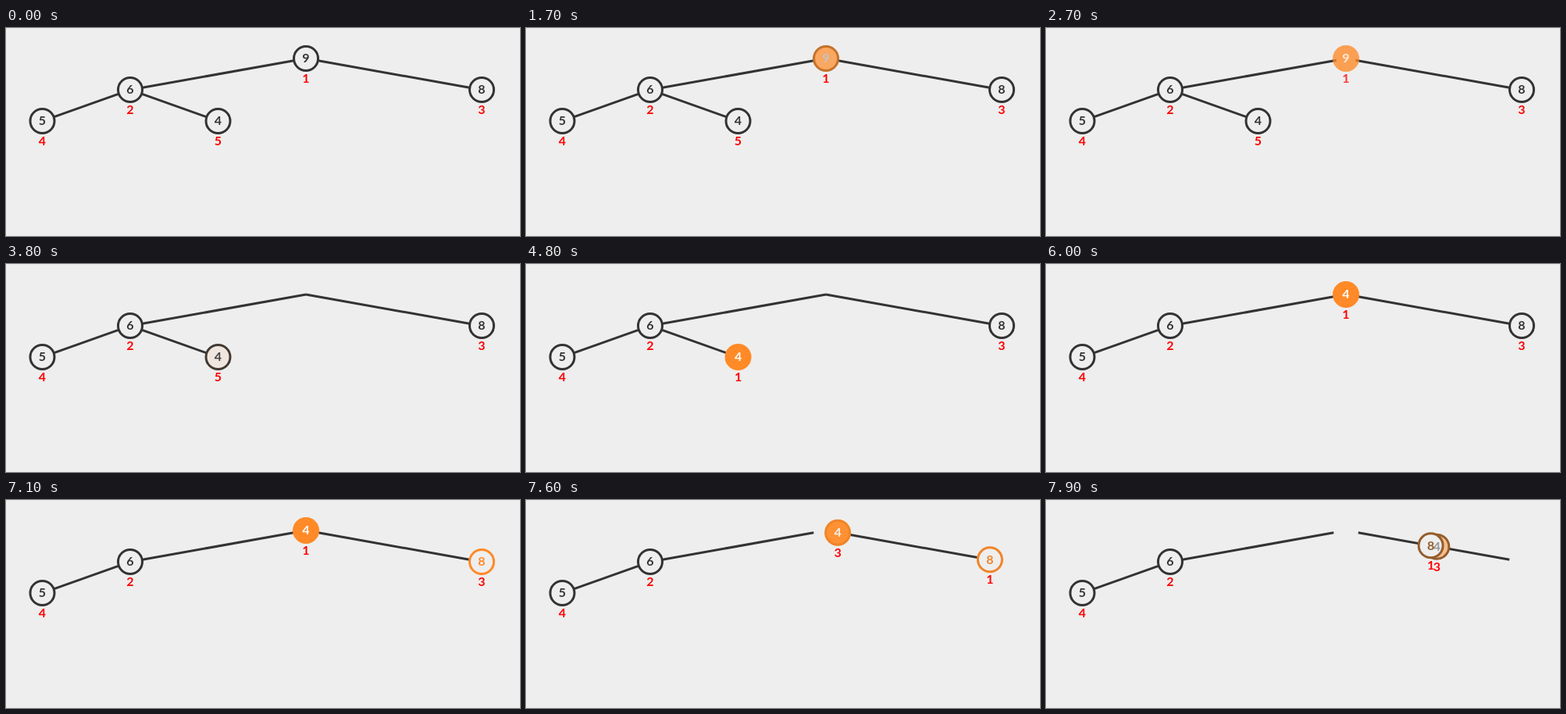
An HTML page for the animation above (8000 ms loop, 658x266 px).

```html
<!DOCTYPE html>
<html lang="en">
<head>
<meta charset="utf-8">
<title>Heap: extract max</title>
<style>
  html, body { margin: 0; width: 100%; height: 100%; overflow: hidden; background: #eee; }
  svg { display: block; width: 658px; height: 266px; }
  line { stroke: #333; stroke-width: 3; }
  circle { stroke-width: 3; }
  text { font: bold 16px Lato, "Open Sans", sans-serif; text-anchor: middle; }
  .index { fill: #f00; }
</style>
</head>
<body>
<svg viewBox="0 0 658 266">
  <rect width="658" height="1" fill="#e9e9e9"/>
  <g id="edges"></g>
  <g id="circles"></g>
  <g id="texts"></g>
</svg>
<script>
const LOOP = 8000, TICK = 100, SPAN = 1200, GAP = 16;
const DARK = [51, 51, 51], PALE = [238, 238, 238], ORANGE = [255, 138, 39], WHITE = [255, 255, 255];
const PLAIN = { fill: PALE, stroke: DARK, ink: DARK };
const SOLID = { fill: ORANGE, stroke: ORANGE, ink: WHITE };
const RING = { fill: PALE, stroke: ORANGE, ink: ORANGE };

// Start time of each step of the algorithm
const STEP = { pickRoot: 1000, dropRoot: 2240, pickLast: 3480, moveLast: 4750, pickChild: 6020, swap: 7293 };

const root = [384, 39], left = [159, 79], right = [609, 79], leaf = [46.5, 119], last = [271.5, 119];

// Point on the rim of the node at a, facing b
const rim = (a, b) => {
  const dx = b[0] - a[0], dy = b[1] - a[1], d = Math.hypot(dx, dy);
  return [a[0] + dx / d * GAP, a[1] + dy / d * GAP];
};

const nodes = [
  { value: 9, start: { at: root, index: 1, alpha: 1, ...PLAIN },
    moves: [[STEP.pickRoot, SOLID], [STEP.dropRoot, { alpha: 0 }]] },
  { value: 6, start: { at: left, index: 2, alpha: 1, ...PLAIN }, moves: [] },
  { value: 5, start: { at: leaf, index: 4, alpha: 1, ...PLAIN }, moves: [] },
  { value: 4, start: { at: last, index: 5, alpha: 1, ...PLAIN },
    moves: [[STEP.pickLast, SOLID], [STEP.moveLast, { at: root, index: 1 }],
            [STEP.swap, { at: right, index: 3, ...PLAIN }]] },
  { value: 8, start: { at: right, index: 3, alpha: 1, ...PLAIN },
    moves: [[STEP.pickChild, RING], [STEP.swap, { at: root, index: 1, ...PLAIN }]] }
];

const rootEdge = child => ({
  start: { from: rim(child, root), to: rim(root, child) },
  moves: [[STEP.dropRoot, { to: root }], [STEP.moveLast, { to: rim(root, child) }]]
});
const fold = rim(left, root);
const edges = [
  rootEdge(left),
  rootEdge(right),
  { start: { from: rim(left, leaf), to: rim(leaf, left) }, moves: [] },
  { start: { from: rim(left, last), to: rim(last, left), alpha: 1 },
    moves: [[STEP.moveLast, { from: fold, to: fold }]] }
];

const ease = t => t < 0.5 ? 4 * t ** 3 : 1 - 4 * (1 - t) ** 3;
const mix = (a, b, p) => Array.isArray(a) ? a.map((v, i) => mix(v, b[i], p)) : a + (b - a) * p;
const rgb = c => `rgb(${c.map(Math.round)})`;

function stateAt(item, time) {
  const state = { ...item.start };
  for (const [begin, target] of item.moves) {
    if (time < begin) break;
    const p = ease(Math.min(1, (time - begin) / SPAN));
    for (const key in target) {
      state[key] = key === "index" ? target[key] : mix(state[key], target[key], p);
    }
  }
  return state;
}

function make(tag, parent, attrs = {}) {
  const el = document.createElementNS("http://www.w3.org/2000/svg", tag);
  set(el, attrs);
  return document.getElementById(parent).appendChild(el);
}
function set(el, attrs) {
  for (const key in attrs) el.setAttribute(key, attrs[key]);
}

for (const e of edges) e.line = make("line", "edges");
for (const n of nodes) {
  n.circle = make("circle", "circles", { r: 15.5 });
  n.text = make("text", "texts");
  n.text.textContent = n.value;
  n.label = make("text", "texts", { class: "index" });
}

function draw(time) {
  for (const e of edges) {
    const { from, to } = stateAt(e, time);
    set(e.line, { x1: from[0], y1: from[1], x2: to[0], y2: to[1] });
  }
  for (const n of nodes) {
    const s = stateAt(n, time), [x, y] = s.at;
    set(n.circle, { cx: x, cy: y, fill: rgb(s.fill), stroke: rgb(s.stroke), opacity: s.alpha });
    set(n.text, { x, y: y + 5.33, fill: rgb(s.ink), opacity: s.alpha });
    set(n.label, { x, y: y + 31, opacity: s.alpha });
    n.label.textContent = s.index;
  }
}

const origin = performance.now();
function frame() {
  const time = (performance.now() - origin) % LOOP;
  draw(Math.floor(time / TICK) * TICK);
  requestAnimationFrame(frame);
}
frame();
</script>
</body>
</html>
```
